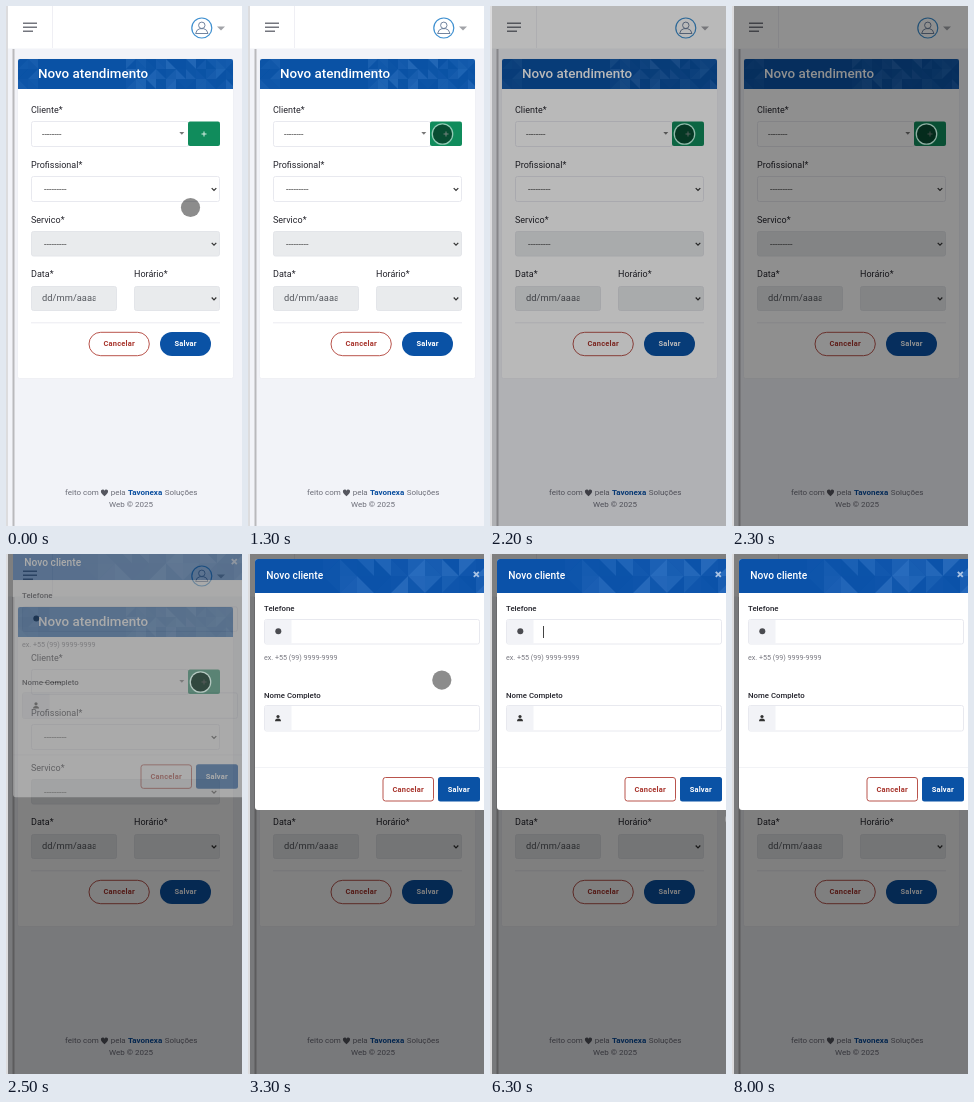
These frames come from a looping animation (236 by 520 pixels, 8.3 s). An HTML page:

```html
<!DOCTYPE html>
<html lang="pt-BR">
<head>
<meta charset="utf-8">
<title>Novo atendimento</title>
<style>
  html, body { margin: 0; width: 236px; height: 520px; overflow: hidden; background: #f2f3f8; }
  svg { display: block; }
  text { font: 9px Roboto, Arial, sans-serif; fill: #23232b; }
  .title { font-size: 13.4px; font-weight: 500; fill: #fff; }
  .modal-title { font-size: 10.2px; font-weight: 500; fill: #fff; }
  .label { font-size: 7.8px; font-weight: 500; }
  .hint { font-size: 7.15px; fill: #7b7b83; }
  .dash { fill: #444; }
  .date { font-size: 9.3px; letter-spacing: .05px; fill: #55585e; }
  .btn { font-size: 7.5px; font-weight: 700; letter-spacing: .2px; fill: #fff; text-anchor: middle; }
  .btn.red { fill: #a8352d; }
  .foot { font-size: 8px; fill: #6c6d78; }
  .foot .brand { font-weight: 700; fill: #0b4f9f; }
  .field { fill: #fff; stroke: #e8e9ef; }
  .off { fill: #e9ebed; stroke: #e3e5e9; }
  .outline { fill: #fff; stroke: #b9544c; }
  .blue { fill: #0a52a5; }
  .rule { stroke: #ebecf1; }
  .chevron { fill: none; stroke: #333; stroke-width: 1.2; }
</style>
</head>
<body>
<svg width="236" height="520" viewBox="0 0 236 520">
  <defs>
    <clipPath id="cardHead"><path d="M12 83V55q0-2 2-2H225q2 0 2 2V83Z"/></clipPath>
    <clipPath id="modalHead"><path d="M7 39V8q0-3 3-3H240V39Z"/></clipPath>
    <clipPath id="dateClip"><rect x="30" y="280" width="59.5" height="25"/></clipPath>
    <path id="chev" class="chevron" d="M-2.3-1.2 0 1.2 2.3-1.2"/>
  </defs>

  <g id="page">
    <rect width="236" height="520" fill="#f2f3f8"/>
    <rect width="236" height="42.5" fill="#fff"/>
    <path d="M46.5 0V42" stroke="#efeff4"/>
    <path d="M17 17.2H31M17 21.2H31M17 25.2H27" stroke="#74767e" stroke-width="1.4"/>
    <g fill="none" stroke="#3d8fd0">
      <circle cx="195.8" cy="22" r="10" stroke-width="1.2"/>
      <g stroke="#637795" stroke-width=".9">
        <circle cx="195.8" cy="19.3" r="3.2"/>
        <path d="M189.6 27.5q1-4.4 4.3-4.8h3.8q3.3.4 4.3 4.8Z"/>
      </g>
    </g>
    <path d="M211 20.4h8l-4 4Z" fill="#a2a3a8"/>
    <rect x="6.5" y="43" width="2" height="477" fill="#b9b9bc"/>

    <rect x="11.5" y="53" width="216" height="319.5" rx="2" fill="#fff" stroke="#ebecf2" stroke-width=".7"/>
    <g id="cardPoly" clip-path="url(#cardHead)"><rect class="blue" x="12" y="53" width="215" height="30"/></g>
    <text class="title" x="32" y="72.3">Novo atendimento</text>

    <text x="25" y="107">Cliente*</text>
    <rect class="field" x="25.5" y="115.5" width="157" height="25" rx="2"/>
    <text class="dash" x="36" y="130.7" style="font-size:8.8px">--------</text>
    <path d="M173.3 126h5l-2.5 2.8Z" fill="#777"/>
    <rect x="182" y="115.5" width="32" height="24.5" rx="2" fill="#108c5c"/>
    <path d="M195.5 128h5M198 125.5v5" stroke="#d5eee3"/>

    <text x="25" y="162">Profissional*</text>
    <rect class="field" x="25.5" y="170.5" width="188" height="25" rx="2"/>
    <text class="dash" x="38" y="186">---------</text>
    <use href="#chev" x="208" y="183.3"/>

    <text x="25" y="217">Servico*</text>
    <rect class="field off" x="25.5" y="225.5" width="188" height="24.5" rx="2"/>
    <text class="dash" x="38" y="241">---------</text>
    <use href="#chev" x="208" y="238"/>

    <text x="25" y="271.2">Data*</text>
    <rect class="field off" x="25.5" y="280.5" width="85" height="24" rx="2"/>
    <g clip-path="url(#dateClip)"><text class="date" x="36" y="295.3">dd/mm/aaaa</text></g>
    <text x="128" y="271.2">Horário*</text>
    <rect class="field off" x="128.5" y="280.5" width="85" height="24" rx="2"/>
    <use href="#chev" x="208" y="292.7"/>

    <path class="rule" d="M25 316.8H214"/>
    <rect class="outline" x="83" y="326.3" width="60.3" height="23.4" rx="11.7"/>
    <text class="btn red" x="113.2" y="340.3">Cancelar</text>
    <rect class="blue" x="154" y="326" width="51" height="24" rx="12"/>
    <text class="btn" x="179.6" y="340.3">Salvar</text>

    <g class="foot">
      <text class="foot" x="59" y="489.3">feito com</text>
      <path d="M98.5 490.3C93 486.2 95 483.3 97 483.6Q98 483.7 98.5 484.8 99 483.7 100 483.6C102 483.3 104 486.2 98.5 490.3Z" fill="#55565f"/>
      <text class="foot" x="104.7" y="489.3">pela</text>
      <text class="foot brand" x="122" y="489.3">Tavonexa</text>
      <text class="foot" x="158.7" y="489.3">Soluções</text>
      <text class="foot" x="103" y="501">Web © 2025</text>
    </g>
  </g>

  <rect id="shade" width="236" height="520" opacity="0"/>

  <g id="modal" opacity="0">
    <rect x="7" y="5" width="240" height="251" rx="3" fill="#fff"/>
    <g id="modalPoly" clip-path="url(#modalHead)"><rect x="7" y="5" width="229" height="34" fill="#0b52a9"/></g>
    <text class="modal-title" x="18.3" y="25">Novo cliente</text>
    <path d="M225.8 17.8l5 5m0-5l-5 5" stroke="#a9c3e4" stroke-width="1.9"/>

    <text class="label" x="16" y="57">Telefone</text>
    <rect class="field" x="16.5" y="65.5" width="215" height="24.5" rx="2"/>
    <rect x="17" y="66" width="26.5" height="23.5" fill="#f2f3f7"/>
    <circle cx="30.3" cy="77.2" r="3" fill="#4a4b50"/>
    <text class="hint" x="16" y="105.7">ex. +55 (99) 9999-9999</text>

    <text class="label" x="16" y="144">Nome Completo</text>
    <rect class="field" x="16.5" y="151.5" width="215" height="25.5" rx="2"/>
    <rect x="17" y="152" width="26.5" height="24.5" fill="#f2f3f7"/>
    <path d="M27 167.2q0-2.6 3-2.6t3 2.6Z" fill="#333"/>
    <circle cx="30" cy="162.5" r="1.6" fill="#333"/>

    <path class="rule" d="M7 213.5H236" opacity=".6"/>
    <rect class="outline" x="135" y="223.5" width="50.5" height="23.5" rx="2.5"/>
    <text class="btn red" x="160.2" y="238">Cancelar</text>
    <rect class="blue" x="190" y="223" width="42" height="24.5" rx="2.5"/>
    <text class="btn" x="210.8" y="238">Salvar</text>
  </g>

  <rect id="caret" x="53" y="72" width="1" height="12" fill="#444"/>
  <rect width="2" height="520" fill="#dcdcde"/>
  <g id="touch">
    <circle r="10.2" fill="none" stroke="#fff" stroke-opacity=".55" stroke-width="1.3"/>
    <circle r="9.6" fill-opacity=".45"/>
  </g>
</svg>
<script>
  const LOOP = 8300, STEP = 100;
  const el = id => document.getElementById(id);
  const clamp = v => Math.min(1, Math.max(0, v));
  const span = (t, from, to) => clamp((t - from) / (to - from));
  const easeInOut = p => (1 - Math.cos(Math.PI * p)) / 2;
  const easeOut = p => 1 - (1 - p) ** 3;

  // Faceted header texture: split grid cells with seeded tints
  function facets(group, x0, y0, x1, y1, size, seed, strength) {
    const rand = () => (seed = (seed * 16807) % 2147483647) / 2147483647;
    let html = '';
    for (let y = y0; y < y1; y += size) {
      for (let x = x0; x < x1; x += size) {
        const r = x + size, b = y + size;
        const halves = rand() < .5
          ? [[x, y, r, y, x, b], [r, y, r, b, x, b]]
          : [[x, y, r, y, r, b], [x, y, r, b, x, b]];
        for (const points of halves) {
          const tint = strength * rand() ** 2;
          html += `<polygon points="${points}" fill="#7db4f5" opacity="${tint.toFixed(3)}"/>`;
        }
      }
    }
    group.insertAdjacentHTML('beforeend', html);
  }
  facets(el('cardPoly'), 12, 53, 30, 83, 10, 71, .16);
  facets(el('cardPoly'), 120, 53, 227, 83, 10, 523, .22);
  facets(el('modalPoly'), 75, 5, 236, 39, 17, 907, .26);

  // Pointer path: [start, end, x, y]
  const moves = [
    [0, 1150, 194.5, 128],
    [3200, 4000, 176.5, 76.5],
    [5700, 6400, 250, 275]
  ];
  function pointer(t) {
    let x = 184.5, y = 201.5;
    for (const [from, to, toX, toY] of moves) {
      const p = easeInOut(span(t, from, to));
      x += (toX - x) * p;
      y += (toY - y) * p;
    }
    return [x, y];
  }

  const caretOn = t =>
    (t >= 5100 && t < 5600) || (t >= 6200 && t < 6800) || (t >= 7400 && t < 8000);

  function draw(now) {
    const t = Math.floor((now % LOOP) / STEP) * STEP;
    const dim = t < 2100 ? 0 : Math.min(.5, .11 + (t - 2100) * .00165);
    const drop = -30 * (1 - easeOut(span(t, 2400, 2800)));
    el('shade').setAttribute('opacity', dim);
    el('modal').setAttribute('opacity', span(t, 2400, 2700));
    el('modal').setAttribute('transform', `translate(0 ${drop})`);
    el('touch').setAttribute('transform', `translate(${pointer(t)})`);
    el('caret').setAttribute('opacity', caretOn(t) ? 1 : 0);
  }

  const start = performance.now();
  function tick() {
    draw(performance.now() - start);
    requestAnimationFrame(tick);
  }
  tick();
</script>
</body>
</html>
```
